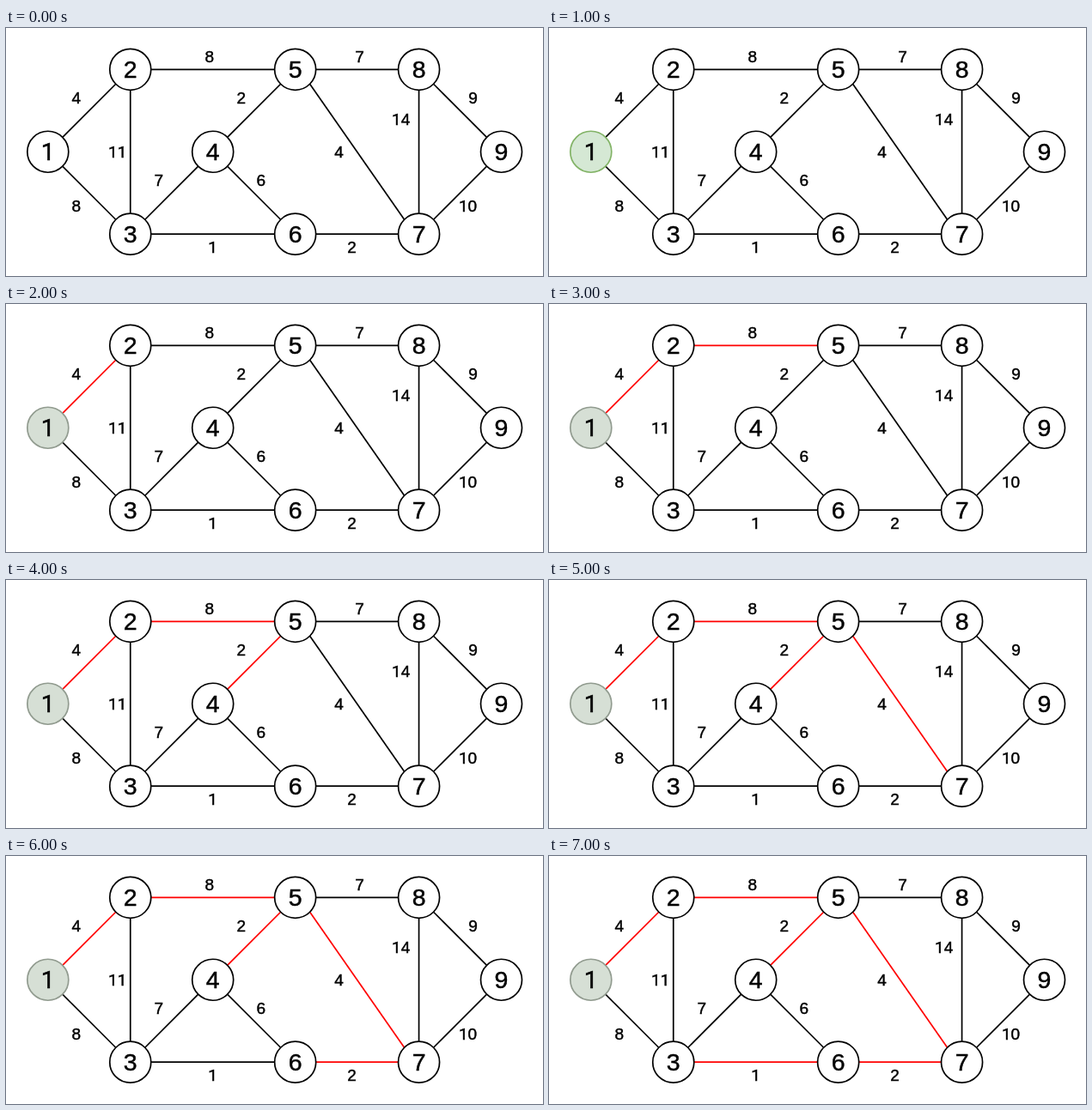
An HTML page that plays this animation: 625x289 px, repeating every 8000 ms.

```html
<!DOCTYPE html>
<html lang="en">
<head>
<meta charset="utf-8">
<title>Minimum spanning tree</title>
<style>
  html, body { margin: 0; width: 100%; height: 100%; overflow: hidden; background: #fff; }
  svg { display: block; }
  line, circle { stroke: #000; stroke-width: 1.7; }
  circle { fill: #fff; }
  text {
    font-family: "Liberation Sans", Arial, sans-serif; text-anchor: middle;
    stroke: #000; stroke-width: 0.45;
  }
  .one { font-family: Roboto, sans-serif; }
</style>
</head>
<body>
<svg id="stage" width="625" height="289" viewBox="0 0 625 289"></svg>
<script>
const STEP = 1000, STEPS = 8, GRID = 95.95, RADIUS = 24, GAP = 15;

// Node positions in grid units; index + 1 is the node number.
const nodes = [[0, 1], [1, 0], [1, 2], [2, 1], [3, 0], [3, 2], [4.5, 2], [4.5, 0], [5.5, 1]]
  .map(([col, row]) => ({ x: 48.8 + col * GRID, y: 48.3 + row * GRID, row }));

// from, to, weight, and the label's shift from the middle of the edge where it
// is not the usual one: to the left, and away from the centre line
const edges = [
  [1, 2, 4], [1, 3, 8], [2, 3, 11], [4, 5, 2],
  [2, 5, 8, -4], [3, 6, 1, 0], [5, 8, 7, 3], [5, 7, 4, -21], [6, 7, 2, -6],
  [8, 9, 9, GAP], [7, 9, 10, 9],
  [3, 4, 7, -GAP, -GAP], [4, 6, 6, 8, -GAP], [7, 8, 14, -21, -38]
].map(([from, to, weight, dx = -GAP, dy]) => {
  const a = nodes[from - 1], b = nodes[to - 1];
  dy ??= GAP * Math.sign(a.row + b.row - 2);
  return { a, b, weight, labelX: (a.x + b.x) / 2 + dx, labelY: (a.y + b.y) / 2 + dy };
});

// Grow the tree by the lightest edge leaving it; on a tie the later edge wins.
function growTree() {
  const reached = new Set([nodes[0]]);
  const order = [];
  while (reached.size < nodes.length) {
    const next = edges
      .filter(({ a, b }) => reached.has(a) !== reached.has(b))
      .reduce((best, edge) => edge.weight <= best.weight ? edge : best);
    reached.add(next.a).add(next.b);
    order.push(next);
  }
  return order;
}

// Edges attach to the circles at multiples of 45 degrees.
function edgeLine({ a, b }) {
  const eighth = Math.PI / 4;
  const angle = Math.round(Math.atan2(b.y - a.y, b.x - a.x) / eighth) * eighth;
  const dx = RADIUS * Math.cos(angle), dy = RADIUS * Math.sin(angle);
  return `<line x1="${a.x + dx}" y1="${a.y + dy}" x2="${b.x - dx}" y2="${b.y - dy}"/>`;
}

function label(value, x, y, size) {
  const digits = String(value).replace(/1/g, '<tspan class="one">1</tspan>');
  return `<text font-size="${size}" x="${x}" y="${y + size * 0.355}">${digits}</text>`;
}

const stage = document.getElementById('stage');
stage.innerHTML =
  edges.map(edgeLine).join('') +
  edges.map(e => label(e.weight, e.labelX, e.labelY, 19)).join('') +
  nodes.map(({ x, y }, i) =>
    `<circle cx="${x}" cy="${y}" r="${RADIUS}"/>` + label(i + 1, x, y, 28.5)).join('');

const lines = stage.querySelectorAll('line');
const start = stage.querySelector('circle');
const tree = growTree();

function draw(time) {
  const step = Math.floor(time / STEP) % STEPS;
  const chosen = tree.slice(0, Math.max(0, step - 1));
  edges.forEach((edge, i) => {
    lines[i].style.stroke = chosen.includes(edge) ? '#f00' : '#000';
  });
  start.style.fill = ['#fff', '#d5e8d4', '#d6dfd5'][Math.min(step, 2)];
  start.style.stroke = ['#000', '#82b366', '#919b8f'][Math.min(step, 2)];
}

const began = performance.now();
function tick() {
  draw(performance.now() - began);
  requestAnimationFrame(tick);
}
tick();
</script>
</body>
</html>
```
